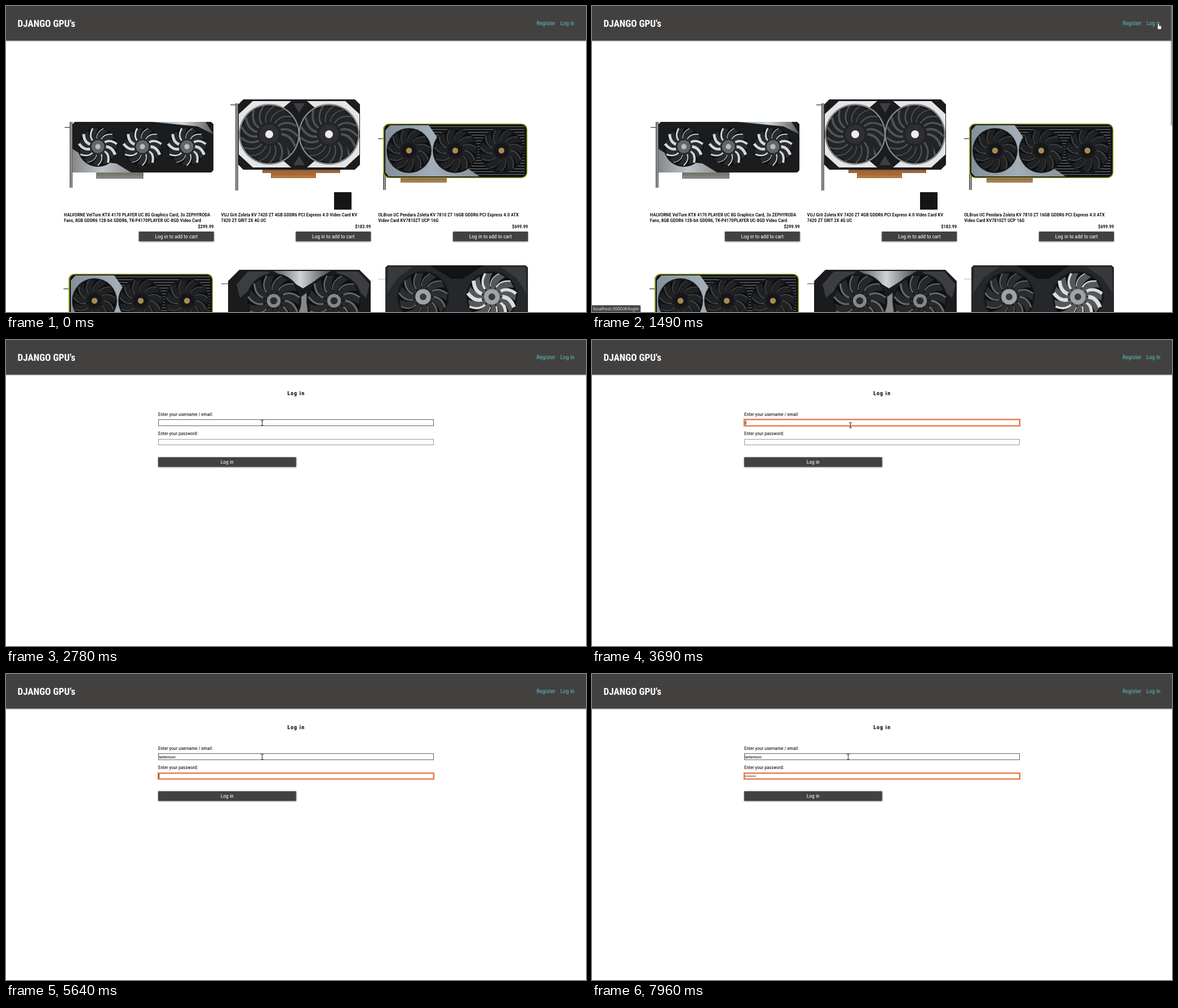
These frames come from a looping animation (1029 by 544 pixels, 8 s). An HTML page with a canvas:

```html
<!DOCTYPE html>
<html lang="en">
<head>
<meta charset="utf-8">
<title>DJANGO GPU's</title>
<style>
html, body { margin: 0; height: 100%; overflow: hidden; background: #fff; }
canvas { display: block; }
</style>
</head>
<body>
<canvas id="stage" width="1029" height="544"></canvas>
<script>
const ctx = document.getElementById('stage').getContext('2d');
const LOOP = 8000, DARK = '#434140', LINK = '#5abcc4', BODY = 8.575;
const clamp = v => Math.max(0, Math.min(1, v));
const ease = v => v * v * (3 - 2 * v);

// ---------- text ----------
const font = (size, weight = 400) => `${weight} condensed ${size}px "Roboto Condensed", Roboto, sans-serif`;
const rawWidth = (s, f) => { ctx.font = f; return ctx.measureText(s).width; };
ctx.textRendering = 'geometricPrecision';
// Narrow plain Roboto evenly when no condensed face is installed.
const squeeze = rawWidth('Register', font(100)) < rawWidth('Register', '400 100px Roboto, sans-serif') * .97 ? 1 : .89;

function at(x, y, draw, sx = 1, sy = 1) {
  ctx.save();
  ctx.translate(x, y);
  ctx.scale(sx, sy);
  draw();
  ctx.restore();
}
function text(s, x, y, size, { weight = 400, color = '#000', align = 'left', spacing = 0 } = {}) {
  at(x, y, () => {
    ctx.font = font(size, weight);
    ctx.letterSpacing = spacing + 'px';
    ctx.textAlign = align;
    ctx.fillStyle = color;
    ctx.fillText(s, 0, 0);
  }, squeeze);
}

// ---------- shapes ----------
function rect(color, x, y, w, h) {
  ctx.fillStyle = color;
  ctx.fillRect(x, y, w, h);
}
function poly(color, ...p) {
  ctx.beginPath();
  for (let i = 0; i < p.length; i += 2) ctx.lineTo(p[i], p[i + 1]);
  ctx.closePath();
  ctx.fillStyle = color;
  ctx.fill();
}
function disc(color, x, y, r) {
  ctx.beginPath();
  ctx.arc(x, y, r, 0, 7);
  ctx.fillStyle = color;
  ctx.fill();
}
function rounded(color, x, y, w, h, r) {
  ctx.beginPath();
  ctx.roundRect(x, y, w, h, r);
  ctx.fillStyle = color;
  ctx.fill();
}
function chamfered(color, x, y, w, h, c) {
  poly(color, x + c, y, x + w - c, y, x + w, y + c, x + w, y + h - c, x + w - c, y + h, x + c, y + h, x, y + h - c, x, y + c);
}
function mirrored(x, y, draw, rows = [-1, 1]) {
  for (const sy of rows) for (const sx of [-1, 1]) at(x, y, draw, sx, sy);
}
function shadedBox(x, y, w, h) {
  ctx.save();
  ctx.shadowColor = 'rgba(0,0,0,.6)';
  ctx.shadowBlur = 2.5;
  ctx.shadowOffsetY = .6;
  rect(DARK, x, y, w, h);
  ctx.restore();
}
function shade(x1, x2, ...colors) {
  const g = ctx.createLinearGradient(x1, 0, x2, 0);
  colors.forEach((c, i) => g.addColorStop(i / (colors.length - 1), c));
  return g;
}

// ---------- graphics cards ----------
// Blades catch the light on two opposite sides of the wheel.
function fan(x, y, r, { ring = '#1b1c1e', blade = '#292b2d', glint = '#8b8d90', shine = .05, hub = '#2d2f32', hubSize = .32, badge = '#c9cacc', blades = 11 }) {
  disc(ring, x, y, r);
  disc('#0e0f10', x, y, r * .95);
  at(x, y, () => {
    for (let i = 0; i < blades; i++) {
      const turn = 2 * Math.PI / blades;
      ctx.rotate(turn);
      ctx.beginPath();
      ctx.moveTo(.25, 0);
      ctx.quadraticCurveTo(.7, 0, .85, .4);
      ctx.lineTo(.68, .62);
      ctx.quadraticCurveTo(.55, .25, .25, .15);
      ctx.fillStyle = blade;
      ctx.fill();
      ctx.beginPath();
      ctx.moveTo(.4, 0);
      ctx.quadraticCurveTo(.72, .02, .85, .4);
      ctx.strokeStyle = glint;
      ctx.lineWidth = .03 + shine * Math.cos((i + 1) * turn) ** 2;
      ctx.stroke();
    }
  }, r, r);
  disc(hub, x, y, r * hubSize);
  disc(badge, x, y, r * .13);
}
const fans = (count, x, y, gap, r, look) => {
  for (let i = 0; i < count; i++) fan(x + i * gap, y, r, look);
};
function connector(x, y, w, h, color) {
  rect(color, x, y, w, h);
  for (let i = x + 2; i < x + w; i += 3) rect('rgba(255,255,255,.3)', i, y + h / 2, 1, h / 2);
}
function bracket(x, top, bottom, tab) {
  rect('#55575a', x - 9, tab, 10, 1.5);
  rect(shade(x, x + 5, '#3a3c3e', '#a2a4a6', '#4c4e50'), x, top, 5, bottom - top);
}

function tripleSilver() {
  connector(160, 296, 84, 11, '#77766f');
  bracket(113, 206, 323, 215);
  chamfered('#1b1c1e', 118, 206, 250, 90, 4);
  poly(shade(118, 222, '#85888b', '#c0c3c6', '#8d9093'), 118, 254, 150, 275, 196, 280, 222, 296, 118, 296);
  poly(shade(258, 368, '#7f9cb2', '#d2d7da', '#55585b'), 258, 206, 354, 206, 368, 228, 340, 214);
  fans(3, 163, 250, 79, 36, { glint: '#d5d6d8', shine: .11, hub: '#636568', badge: '#b8babc' });
}
function dualWhite() {
  connector(455, 290, 138, 7, '#8f5a30');
  connector(470, 296, 80, 10, '#a9672f');
  bracket(407, 173, 328, 175);
  chamfered('#1b1c1e', 412, 166, 216, 125, 9);
  mirrored(520, 228, () => poly('#e4e5e6', 14, -59, 82, -59, 107, -36, 107, -6, 60, -20));
  mirrored(520, 228, () => poly('#3d3f42', 0, -38, 10, -55, 0, -55));
  fans(2, 467, 228, 106, 54, { ring: '#808285', blade: '#222426', glint: '#505255', badge: '#eee', blades: 17 });
  rect('#151515', 582, 331, 31, 31);
}
function tripleGreen() {
  connector(700, 305, 82, 9, '#9c7044');
  bracket(669, 216, 327, 235);
  rounded('#949f25', 669, 209, 256, 97, 10);
  rounded('#111315', 671, 210.5, 252.5, 94, 9);
  for (let i = 0; i < 18; i++) rect('#777b7f', 752, 214 + i * 5, 168, 1);
  poly(shade(675, 835, '#84909a', '#a2adb7', '#8a949e'), 681, 212, 750, 212, 790, 269, 840, 303, 679, 303, 673, 296, 673, 221);
  fans(3, 715, 257, 82, 40, { blade: '#1f2123', glint: '#45494d', shine: .02, hub: '#15171a', badge: '#aa8b50' });
}
function dualSteel() {
  rect('#77797b', 382, 493, 18, 1.5);
  chamfered('#1a1b1d', 394, 469, 253, 120, 20);
  poly(shade(474, 570, '#55585b', '#d0d3d5', '#55585b'), 474, 471, 576, 471, 527, 502);
  mirrored(527, 469, () => poly('#3b3d40', 58, 3, 98, 3, 118, 26, 112, 50), [1]);
  poly('#85888b', 520, 520, 533, 510, 535, 544, 510, 544);
  fans(2, 475, 524, 107, 49, { blade: '#26282a', glint: '#67696c', shine: .04, hub: '#85878a', badge: '#292b2e', hubSize: .25 });
}
function dualDark() {
  rect('#b9bbbd', 660, 485, 16, 1);
  chamfered('#26272a', 673, 461, 253, 120, 4);
  mirrored(800, 461, () => {
    poly('#121315', 0, 0, 48, 0, 10, 24, 0, 24);
    poly('#37393c', 78, 3, 122, 3, 124, 50, 105, 22);
  }, [1]);
  const look = { blade: '#2b2d30', glint: '#66686b', shine: .03, hub: '#a0a2a4', badge: '#393b3e', hubSize: .3 };
  fan(740, 517, 46, look);
  fan(862, 517, 46, { ...look, blade: '#55575a', glint: '#dcddde', shine: .12 });
}

// ---------- pages ----------
function button(label, x, y, w) {
  shadedBox(x, y, w, 17);
  text(label, x + w / 2, y + 11.9, 9.5, { color: '#fff', align: 'center' });
}
function header() {
  shadedBox(-5, -5, 1039, 66.5);
  text("DJANGO GPU's", 20.6, 36.8, 17.15, { weight: 700, color: '#fff' });
  text('Register', 941.2, 34.4, 10.3, { color: LINK });
  text('Log in', 983.4, 34.4, 10.3, { color: LINK });
}

const products = [
  ['HALVORNE VelTure KTX 4170 PLAYER UC 8G Graphics Card, 3x ZEPHYRODA', 'Fans, 8GB GDDR6 128-bit GDDR6, TK-P4170PLAYER UC-8GD Video Card', '$299.99'],
  ['VUJ Grit Zoleta KV 7420 ZT 4GB GDDR6 PCI Express 4.0 Video Card KV', '7420 ZT GRIT 2X 4G UC', '$183.99'],
  ['OLBrun UC Pendara Zoleta KV 7810 ZT 16GB GDDR6 PCI Express 4.0 ATX', 'Video Card KV7810ZT UCP 16G', '$699.99'],
];
function shopPage() {
  tripleSilver();
  dualWhite();
  tripleGreen();
  at(-558, 267, tripleGreen);
  dualSteel();
  dualDark();
  products.forEach(([first, second, price], i) => {
    const x = 102.8 + 278.7 * i, right = x + 265.8;
    text(first, x, 374.2, BODY, { weight: 500 });
    text(second, x, 384.3, BODY, { weight: 500 });
    text(price, right, 394.6, BODY, { weight: 500, align: 'right' });
    button('Log in to add to cart', right - 132.9, 401, 132.9);
  });
}

function field(y, h, focused, hovered) {
  ctx.strokeStyle = 'rgba(233,84,32,.3)';
  ctx.lineWidth = 4;
  if (focused) ctx.strokeRect(270, y, 489, h);
  rect('#fff', 270, y, 489, h);
  ctx.strokeStyle = focused ? '#e2591f' : hovered ? '#606060' : '#999';
  ctx.lineWidth = focused ? 1.6 : 1;
  ctx.strokeRect(270.5, y, 488, h);
}
// Number of evenly paced key presses made by time t.
const pressed = (t, first, last, count) =>
  t < first ? 0 : Math.min(count, 1 + Math.floor((t - first) / (last - first) * (count - 1)));

// The last letter is mistyped, deleted and typed again.
function typedName(t) {
  if (t >= 5230) return 'lanternuvo';
  return 'lanternuvk'.slice(0, t < 4980 ? pressed(t, 3690, 4570, 10) : 9);
}
function loginPage(t, hovered) {
  const name = typedName(t), dots = pressed(t, 6060, 7380, 8);
  const onName = t >= 2940 && t < 5640, onPassword = t >= 5640;
  text('Log in', 499.2, 98, 10.03, { weight: 700, spacing: 1.07 });
  text('Enter your username / email:', 270, 135.1, BODY);
  text('Enter your password:', 270, 169.4, BODY);
  field(141.5, 11, onName, hovered);
  field(176.5, 10, onPassword, false);
  text(name, 271.2, 149.7, 7.15);
  for (let i = 0; i < dots; i++) disc('#000', 272.5 + 2.42 * i, 181.5, .85);
  if (onName) rect('#000', 271 + rawWidth(name, font(7.15)) * squeeze, 143, .8, 8);
  if (onPassword && t < 7880) rect('#000', 271 + 2.42 * dots, 177.5, .8, 8);
  button('Log in', 270, 208.5, 244.5);
}

function statusBar() {
  rounded('#484848', -2, 532, 88.3, 14, [0, 2, 0, 0]);
  ctx.font = '400 7.7px "Noto Sans", sans-serif';
  ctx.fillStyle = '#e8e8e8';
  ctx.fillText('localhost:3000/#/login', 2, 541);
}

// ---------- mouse ----------
function outlined(addPath) {
  ctx.beginPath();
  addPath();
  ctx.strokeStyle = '#222';
  ctx.lineWidth = 1.4;
  ctx.stroke();
  ctx.fillStyle = '#fff';
  ctx.fill();
}
const pointers = {
  arrow: () => poly('#111', 0, 0, 6, 6.4, 3, 6.6, 0, 9),
  hand: () => outlined(() => {
    ctx.roundRect(-1, 0, 2, 7, 1);
    ctx.roundRect(-1.5, 3.6, 6.5, 5.6, 1.4);
  }),
  beam() {
    rect('#222', -.5, -4, 1, 8);
    rect('#222', -2.5, -5, 5, 1);
    rect('#222', -2.5, 4, 5, 1);
  },
};
// Eased travel, advancing in 80 ms steps.
const travel = (t, start, steps) => ease(clamp(Math.floor((t - start) / 80) / steps));

function mouseAt(t) {
  if (t < 1980) {
    const p = travel(t, 1010, 6);
    return [950 + 55 * p, 150 - 118 * p];
  }
  const p = travel(t, 1980, 10), nudge = t >= 2940 && t < 4570 ? 4 : 0;
  return [1005 - 550.5 * p + nudge, 32 + 115.5 * p + nudge];
}

function draw(t) {
  const [x, y] = mouseAt(t);
  const overLink = x > 983 && x < 1009 && y < 37;
  const overField = x < 759 && y > 141 && t >= 1980;
  rect('#fff', 0, 0, 1029, 544);
  if (t < 1980) shopPage(); else loginPage(t, overField);
  header();
  if (t < 1090) return;
  if (t < 1980) rect('rgba(128,128,128,.9)', 1027, 0, 1.5, 212.5);
  if (overLink || t > 1980 && t < 2300) statusBar();
  at(x, y, pointers[overLink ? 'hand' : overField ? 'beam' : 'arrow']);
}

function tick() {
  draw(performance.now() % LOOP);
  requestAnimationFrame(tick);
}
tick();
</script>
</body>
</html>
```
